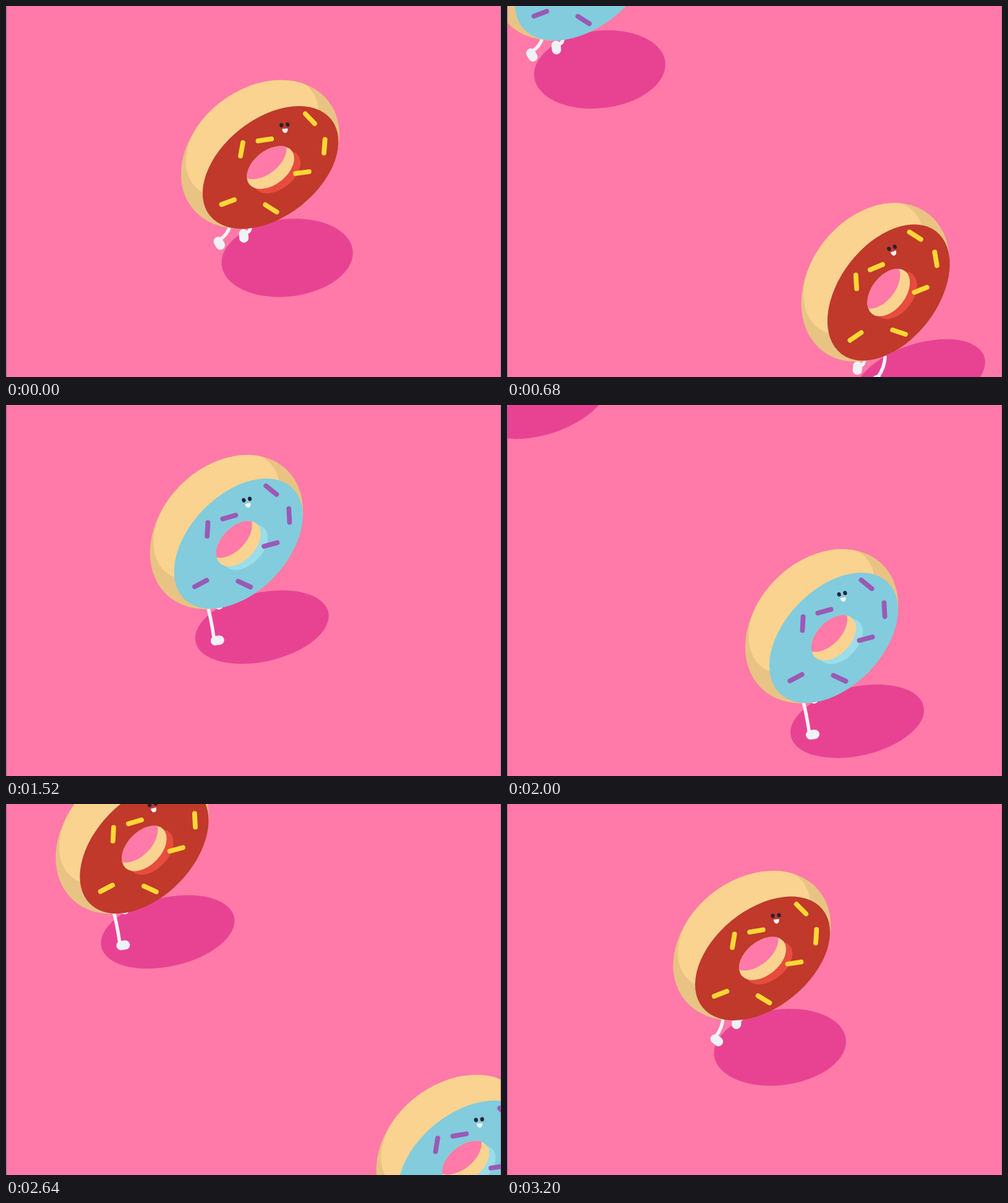
These frames come from a looping animation (800x600 px, 3240 ms). An HTML page with a canvas:

```html
<!DOCTYPE html>
<html>
<head>
<meta charset="utf-8">
<style>
html, body { margin: 0; width: 100%; height: 100%; overflow: hidden; background: #ff7aa8; }
canvas { display: block; }
</style>
</head>
<body>
<canvas id="stage" width="800" height="600"></canvas>
<script>
const ctx = document.getElementById('stage').getContext('2d');
const LOOP = 3240, STEP = 40, STRIDE = 480, SPEED = 0.3173;
const RAD = Math.PI / 180;
const PINK = '#ff7aa8', DOUGH = '#fad390', CRUST = '#e8c383', WHITE = '#f1f2f6';

const RED = { icing: '#c0392b', inner: '#e74c3c', sprinkle: '#fdd835', delay: 0 };
const BLUE = { icing: '#82ccdd', inner: '#9bdde9', sprinkle: '#9b59b6', delay: 1640 };

// x, y, angle
const SPRINKLES = [
  [478, 353.5, 93], [513, 333.5, -16], [581, 290, 39], [610, 331, 87],
  [580, 378, -15], [467, 441, -28], [537.5, 442, 25]
];

// Foot x, y, angle at twelve equal moments of one stride
const STEPS = [
  [494, 533, -8], [481, 521, 12], [466, 509, 38], [459, 498, 60],
  [459, 486, 80], [463, 473, 95], [464, 476, 100], [464, 478, 100],
  [465, 484, 95], [465.5, 490, 85], [472, 508, 50], [483, 526, 12]
];

function ellipse(x, y, a, b, color, angle = 0) {
  ctx.beginPath();
  ctx.ellipse(x, y, a, b, angle * RAD, 0, 7);
  ctx.fillStyle = color;
  ctx.fill();
}

function stroke(width, color) {
  ctx.lineWidth = width;
  ctx.strokeStyle = color;
  ctx.stroke();
}

function pill(x, y, angle, half, width, color) {
  const dx = half * Math.cos(angle * RAD), dy = half * Math.sin(angle * RAD);
  ctx.beginPath();
  ctx.moveTo(x - dx, y - dy);
  ctx.lineTo(x + dx, y + dy);
  stroke(width, color);
}

function clipped(x, y, a, b, draw) {
  ctx.save();
  ctx.beginPath();
  ctx.ellipse(x, y, a, b, 0, 0, 7);
  ctx.clip();
  draw();
  ctx.restore();
}

function footAt(phase) {
  const k = phase * 12 % 12, i = Math.floor(k);
  const next = STEPS[(i + 1) % 12];
  return STEPS[i].map((v, j) => v + (next[j] - v) * (k - i));
}

function leg(phase, dx, dy) {
  let [x, y, angle] = footAt(phase);
  x += dx;
  y += dy;
  const c = Math.cos(angle * RAD), s = Math.sin(angle * RAD);
  const hipX = 476.5 + dx, hipY = 470 + dy;
  const ankleX = x - 5 * c + 4 * s, ankleY = y - 5 * s - 4 * c;
  const bend = Math.hypot(hipX - ankleX, hipY - ankleY) / 2;
  ctx.beginPath();
  ctx.moveTo(hipX, hipY);
  ctx.quadraticCurveTo(ankleX + bend * s, ankleY - bend * c, ankleX, ankleY);
  stroke(5.5, WHITE);
  pill(x, y, angle, 3.5, 15, WHITE);
}

function shadow(s) {
  const q = s * s;
  ellipse(566 + 1.5 * s + 1.2 * q, 511.5 + 11.8 * s - 1.8 * q,
    110 - 1.4 * s - 2 * q, 55.6 + 3.5 * s + 3.5 * q, '#e84393', 6.3 * s - 12.8);
}

function face() {
  ctx.save();
  ctx.translate(541.5, 305.2);
  ctx.rotate(-13 * RAD);
  ellipse(-5, 0, 3.1, 3.5, '#29203a');
  ellipse(5, 0, 3.1, 3.5, '#29203a');
  ctx.beginPath();
  ctx.moveTo(-4.6, 6.2);
  ctx.lineTo(4.6, 6.2);
  ctx.bezierCurveTo(4.6, 15.5, -4.6, 15.5, -4.6, 6.2);
  ctx.fillStyle = WHITE;
  ctx.fill();
  ctx.restore();
}

function body(look) {
  // x runs along the long axis of the ring, y from back to front
  ctx.save();
  ctx.translate(528, 376.5);
  ctx.rotate(-45.8 * RAD);
  ellipse(0, -27, 140, 106, CRUST);
  clipped(0, -27, 140, 106, () => ellipse(7, -56, 122, 79, DOUGH));
  ellipse(0, 0, 125.2, 79, look.icing);
  ellipse(3.5, 12, 43.7, 27.5, look.inner);
  ellipse(0, 0, 43.7, 27.5, DOUGH);
  clipped(0, 0, 43.7, 27.5, () => ellipse(0, -20, 43.7, 27.5, PINK));
  ctx.restore();
  for (const [x, y, angle] of SPRINKLES) pill(x, y, angle, 11, 7.8, look.sprinkle);
  face();
}

function donut(look, time) {
  const half = LOOP / 2;
  const age = ((time - look.delay + half) % LOOP + LOOP) % LOOP - half;
  const travel = (age - 360) * SPEED;
  const phase = ((age - 360) / STRIDE + 12) % 1;
  const s = Math.sin(phase * 2 * Math.PI);

  ctx.save();
  ctx.translate(travel, travel);
  shadow(s);
  leg(phase + 0.5, 33, -4);
  leg(phase, 0, 0);
  // Rock around the hip, with a hop at both ends of the swing
  ctx.translate(462.5, 486 - 10.6 * s * s);
  ctx.rotate(7.5 * s * RAD);
  ctx.translate(-462.5, -486);
  body(look);
  ctx.restore();
}

function frame() {
  const time = Math.floor(performance.now() % LOOP / STEP) * STEP;
  ctx.lineCap = 'round';
  ctx.fillStyle = PINK;
  ctx.fillRect(0, 0, 800, 600);
  donut(RED, time);
  donut(BLUE, time);
  ctx.fillStyle = '#9565b3';
  ctx.fillRect(0, 0, 1, 600);
  ctx.fillRect(799.4, 0, 0.6, 600);
  requestAnimationFrame(frame);
}
frame();
</script>
</body>
</html>
```
